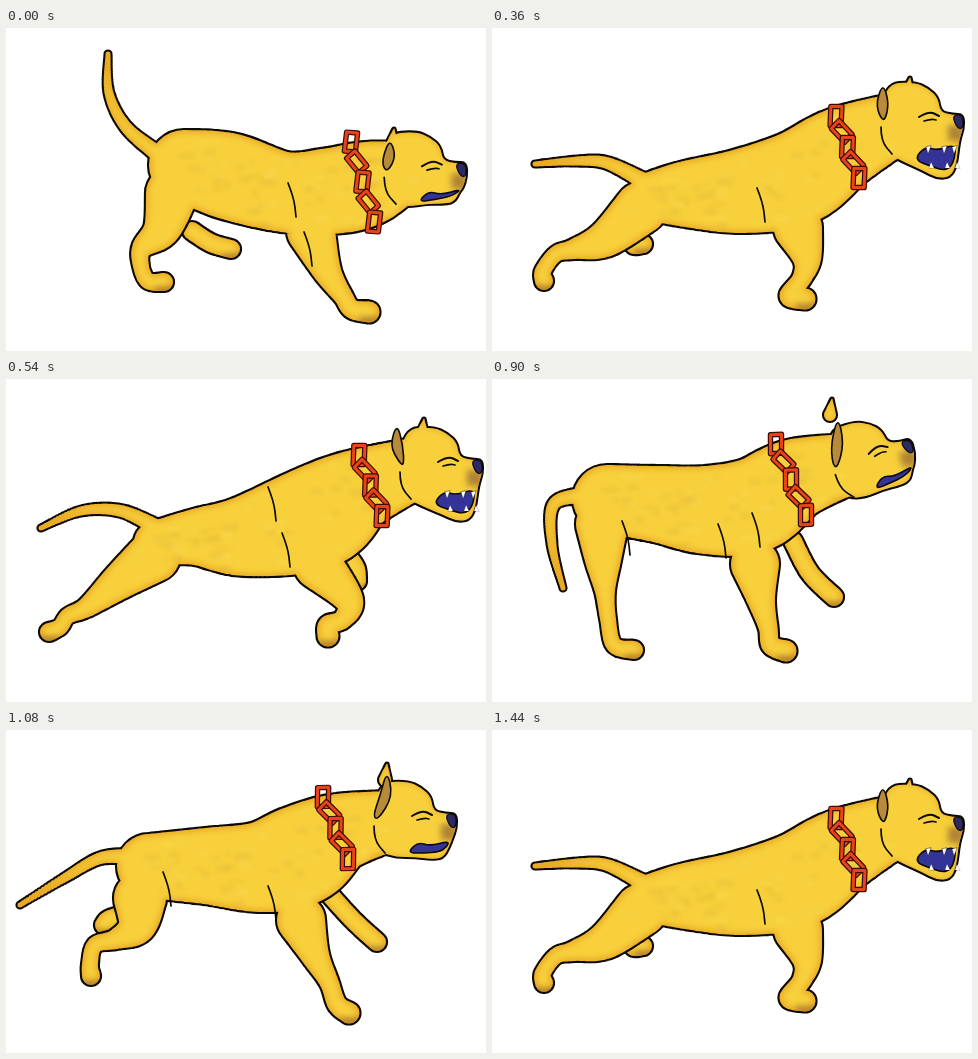
These frames come from a looping animation (480x323 px, 1.62 s). An HTML page with a canvas:

```html
<!DOCTYPE html>
<html lang="en">
<head>
<meta charset="utf-8">
<title>Running dog</title>
<style>
  html, body { margin: 0; width: 100%; height: 100%; overflow: hidden; background: #fff; }
  canvas { display: block; }
</style>
</head>
<body>
<canvas id="stage" width="480" height="323"></canvas>
<script>
const ctx = document.getElementById('stage').getContext('2d');
const STEP = 180;
const SKIN = '#f7d03c', ORANGE = '#e9a925', BROWN = '#b78a3c', NAVY = '#2b2966', BLUE = '#343397', INK = '#0d0906';

// Thickness of the limbs at each joint, the same in every pose.
const RADII = { tail: [2.5, 4.5, 6, 8], hind: [26, 18, 10, 8, 8, 9], fore: [24, 14, 9.5, 9.5, 10.5], far: [9, 9, 9] };

// Joints as x, y; the torso as x, y, radius. The head hangs on the nose tip, ears on their tips.
const poses = {
  crouch: {
    torso: [178,137,35, 222,148,43, 278,164,40, 325,163,43, 360,156,42],
    tail: [102,26, 103,65, 120,99, 152,126],
    hind: [166,165, 156,201, 136,220, 135,238, 142,253, 158,254],
    fore: [305,203, 321,243, 337,268, 346,281, 363,284],
    far: [[186,203, 205,215, 225,221]],
    head: { x: 459, y: 141, turn: -0.03, jaw: -5 }, ears: [384,113, 388,100],
    chain: [345,114, 368,194], creases: [282,155, 298,204]
  },
  prowl: {
    torso: [160,148,25, 200,151,35, 255,158,41, 300,160,43, 342,137,41],
    tail: [41,106, 85,116, 128,126, 155,137],
    hind: [152,172, 130,202, 101,209, 89,212, 87,234, 90,247],
    fore: [291,200, 297,231, 307,253, 317,267, 329,271],
    far: [[168,206, 172,210, 177,210]],
    head: { x: 447, y: 105, turn: -0.17, jaw: -4 }, ears: [355,92, 361,77],
    chain: [328,103, 363,173], creases: [272,162, 179,156]
  },
  snarl: {
    torso: [160,168,24, 195,166,33, 250,163,42, 305,150,47, 350,120,41],
    tail: [43,136, 85,133, 115,135, 150,152],
    hind: [149,180, 113,211, 82,221, 64,226, 51,243, 52,253],
    fore: [306,200, 315,230, 310,250, 297,268, 313,271],
    far: [[142,217, 146,217, 151,216]],
    head: { x: 470, y: 93, turn: 0, jaw: 18 }, ears: [391,57, 418,49],
    chain: [344,88, 367,150], creases: [265,160]
  },
  leap: {
    torso: [150,164,22, 190,158,28, 240,157,40, 310,138,52, 350,112,41],
    tail: [35,149, 75,132, 115,132, 152,149],
    hind: [148,177, 114,202, 81,228, 62,237, 54,248, 43,253],
    fore: [312,186, 343,221, 337,240, 322,246, 322,257],
    far: [[344,180, 350,190, 351,202]],
    head: { x: 475, y: 87, turn: 0, jaw: 16 }, ears: [391,46, 418,39],
    chain: [353,76, 376,137], creases: [276,154, 262,108]
  },
  stride: {
    torso: [143,136,32, 200,136,38, 255,137,45, 295,125,50, 332,103,39],
    tail: [14,175, 60,147, 95,128, 130,127],
    hind: [134,168, 131,196, 110,209, 89,215, 84,234, 85,246],
    fore: [295,190, 309,225, 323,252, 331,274, 343,283],
    far: [[110,187, 102,190, 98,195], [325,166, 348,191, 371,212]],
    head: { x: 449, y: 90, turn: 0, jaw: 0 }, ears: [381,42, 381,33],
    chain: [317,67, 342,129], creases: [262,156, 157,142]
  },
  stand: {
    torso: [115,120,34, 165,125,38, 215,131,44, 262,126,47, 303,100,40],
    tail: [71,209, 60,165, 62,125, 94,116],
    hind: [110,145, 111,180, 113,212, 116,240, 122,266, 142,271],
    fore: [263,185, 269,220, 276,248, 279,266, 294,272],
    far: [[301,162, 318,194, 342,218]],
    head: { x: 419, y: 66, turn: -0.3, jaw: -4 }, ears: [346,39, 340,19],
    chain: [284,65, 314,136], creases: [260,134, 226,145, 130,142]
  }
};

const sequence = ['crouch', 'prowl', 'snarl', 'leap', 'stride', 'stand', 'stride', 'leap', 'snarl'];

const groups = (flat, size) =>
  Array.from({ length: flat.length / size }, (_, i) => flat.slice(i * size, i * size + size));

const joints = (flat, radii) => groups(flat, 2).map((p, i) => [...p, radii[i]]);

function spline(a, b, c, d, t) {
  return b.map((v, k) => v + t * (c[k] - a[k]) / 2
    + t * t * (a[k] - 2.5 * v + 2 * c[k] - d[k] / 2)
    + t * t * t * (1.5 * (v - c[k]) + (d[k] - a[k]) / 2));
}

// A rounded tube: closely spaced discs along a spline of [x, y, radius].
function tube(path, nodes, inset) {
  const steps = 16, at = i => nodes[Math.max(0, Math.min(nodes.length - 1, i))];
  for (let i = 0; i <= (nodes.length - 1) * steps; i++) {
    const k = Math.floor(i / steps);
    const [x, y, r] = spline(at(k - 1), at(k), at(k + 1), at(k + 2), i / steps - k);
    const radius = Math.max(0.5, r - inset);
    path.moveTo(x + radius, y);
    path.arc(x, y, radius, 0, 7);
  }
}

// Line through points, rounded at the midpoints.
function shape(points, closed) {
  const path = new Path2D(), n = points.length;
  const mid = i => [0, 1].map(k => (points[i % n][k] + points[(i + 1) % n][k]) / 2);
  path.moveTo(...(closed ? mid(n - 1) : points[0]));
  for (let i = closed ? 0 : 1; i < (closed ? n : n - 1); i++) path.quadraticCurveTo(...points[i], ...mid(i));
  if (!closed) path.lineTo(...points[n - 1]);
  return path;
}

function ink(path, width = 1.7, color = INK) {
  ctx.strokeStyle = color;
  ctx.lineWidth = width;
  ctx.stroke(path);
}

function paint(path, color, outline = 1.2) {
  ctx.fillStyle = color;
  ctx.fill(path);
  ink(path, outline);
}

const headMatrix = ({ x, y, turn }) => new DOMMatrix().translate(x, y).rotate(turn * 180 / Math.PI);

const headOutline = jaw => shape([
  [-78, -37], [-48, -39], [-33, -32], [-24, -23], [-22, -9], [-9, -6], [1, -6], [1, 8], [-3, 19],
  [-6, 27 + jaw], [-12, 38 + jaw], [-25, 39 + jaw], [-39, 37 + 0.7 * jaw], [-59, 37 + 0.2 * jaw], [-75, 32], [-84, 20]
], true);

function silhouette(pose, inset) {
  const path = new Path2D(), matrix = headMatrix(pose.head);
  const skull = matrix.transformPoint(new DOMPoint(-61, 0));
  tube(path, [...groups(pose.torso, 3), [skull.x, skull.y, 29]], inset);
  for (const limb of ['tail', 'hind', 'fore']) tube(path, joints(pose[limb], RADII[limb]), inset);
  const [, , earX, earY] = pose.ears;
  tube(path, [[earX, earY + 1, 0.5], [earX - 2, earY + 17, 6]], 0);
  path.addPath(headOutline(pose.head.jaw), matrix);
  return path;
}

// Outline, orange rim, then a softly faded skin tone inside it.
function flesh(outer, inner, paws) {
  ink(outer, 4.2);
  ctx.fillStyle = ORANGE;
  ctx.fill(outer);
  ctx.save();
  ctx.clip(outer);
  ctx.filter = 'blur(3px)';
  ctx.fillStyle = SKIN;
  ctx.fill(inner);
  ctx.fillStyle = 'rgba(140,95,40,.65)';
  for (const [x, y] of paws) ctx.fillRect(x - 9, y + 5, 20, 7);
  ctx.restore();
}

// Faint mottling along the torso.
function mottle(outer, torso) {
  let seed = 7;
  const random = () => (seed = seed * 16807 % 2147483647) / 2147483647;
  ctx.save();
  ctx.clip(outer);
  ctx.filter = 'blur(2px)';
  for (const [x, y, r] of groups(torso, 3)) {
    for (let i = 0; i < 14; i++) {
      ctx.fillStyle = i % 2 ? 'rgba(190,145,50,.16)' : 'rgba(255,225,100,.25)';
      ctx.fillRect(x + (random() - 0.5) * 2 * r, y + (random() - 0.5) * 1.6 * r, 4 + random() * 12, 2 + random() * 4);
    }
  }
  ctx.restore();
}

function drawFace({ x, y, turn, jaw }) {
  ctx.save();
  ctx.translate(x, y);
  ctx.rotate(turn);
  ctx.save();
  ctx.clip(headOutline(jaw));
  ctx.filter = 'blur(3px)';
  ctx.fillStyle = 'rgba(150,105,50,.75)';
  ctx.fillRect(-14, 4, 15, 16);
  ctx.restore();
  paint(shape([[-10, -6], [1, -6], [1, 8], [-5, 7]], true), NAVY);
  paint(shape([[-48, 33 + 0.3 * jaw], [-37, 22 + 0.2 * jaw], [-25, 26 + 0.2 * jaw], [-6, 21 + 0.1 * jaw],
    [-8, 27 + 0.8 * jaw], [-16, 32 + jaw], [-31, 33 + 0.7 * jaw]], true), BLUE, 1.6);
  if (jaw > 5) {
    for (const tooth of [-34, -18, -8]) {
      paint(new Path2D(`M${tooth - 2} 26l2 7l3 -8z`), '#fff', 0.4);
      paint(new Path2D(`M${tooth + 1} ${29 + jaw}l2 -6l3 6z`), '#fff', 0.2);
    }
  }
  ink(shape([[-43, -4], [-33, -10], [-23, -5]]), 2);
  ink(shape([[-38, 0], [-31, -2], [-26, -1]]));
  ink(shape([[-81, 6], [-81, 20], [-70, 33]]));
  ctx.restore();
}

function drawEar(pose) {
  const base = headMatrix(pose.head).transformPoint(new DOMPoint(-79, 0));
  const [tipX, tipY] = pose.ears, midY = (base.y + tipY) / 2;
  paint(shape([[tipX, tipY - 2], [tipX + 6, midY], [base.x + 2, base.y], [base.x - 3, base.y - 4], [tipX - 7, midY]], true), BROWN, 1.6);
}

function drawChain([x1, y1, x2, y2]) {
  const links = 5, angle = Math.atan2(y2 - y1, x2 - x1);
  for (let i = 0; i < links; i++) {
    const t = i / (links - 1);
    ctx.save();
    ctx.translate(x1 + (x2 - x1) * t, y1 + (y2 - y1) * t);
    ctx.rotate(angle + (i % 2 ? -0.35 : 0.45));
    const link = new Path2D('M-10 -5L9 -6L10 5L-9 6Z');
    ink(link, 5.4, '#3a0c00');
    ink(link, 3, '#e8431a');
    ctx.restore();
  }
}

function drawDog(pose) {
  ctx.fillStyle = '#fff';
  ctx.fillRect(0, 0, 480, 323);
  ctx.lineCap = ctx.lineJoin = 'round';
  for (const limb of pose.far) {
    const [outer, inner] = [0, 2].map(inset => {
      const path = new Path2D();
      tube(path, joints(limb, RADII.far), inset);
      return path;
    });
    flesh(outer, inner, [limb.slice(-2)]);
  }
  const outer = silhouette(pose, 0);
  flesh(outer, silhouette(pose, 2.5), [pose.hind.slice(-2), pose.fore.slice(-2)]);
  mottle(outer, pose.torso);
  for (const [x, y] of groups(pose.creases, 2)) ink(shape([[x, y], [x + 6, y + 15], [x + 8, y + 34]]));
  drawFace(pose.head);
  drawEar(pose);
  drawChain(pose.chain);
}

let shown;
function tick() {
  const name = sequence[Math.floor(performance.now() / STEP) % sequence.length];
  if (name !== shown) drawDog(poses[shown = name]);
  requestAnimationFrame(tick);
}
tick();
</script>
</body>
</html>
```
